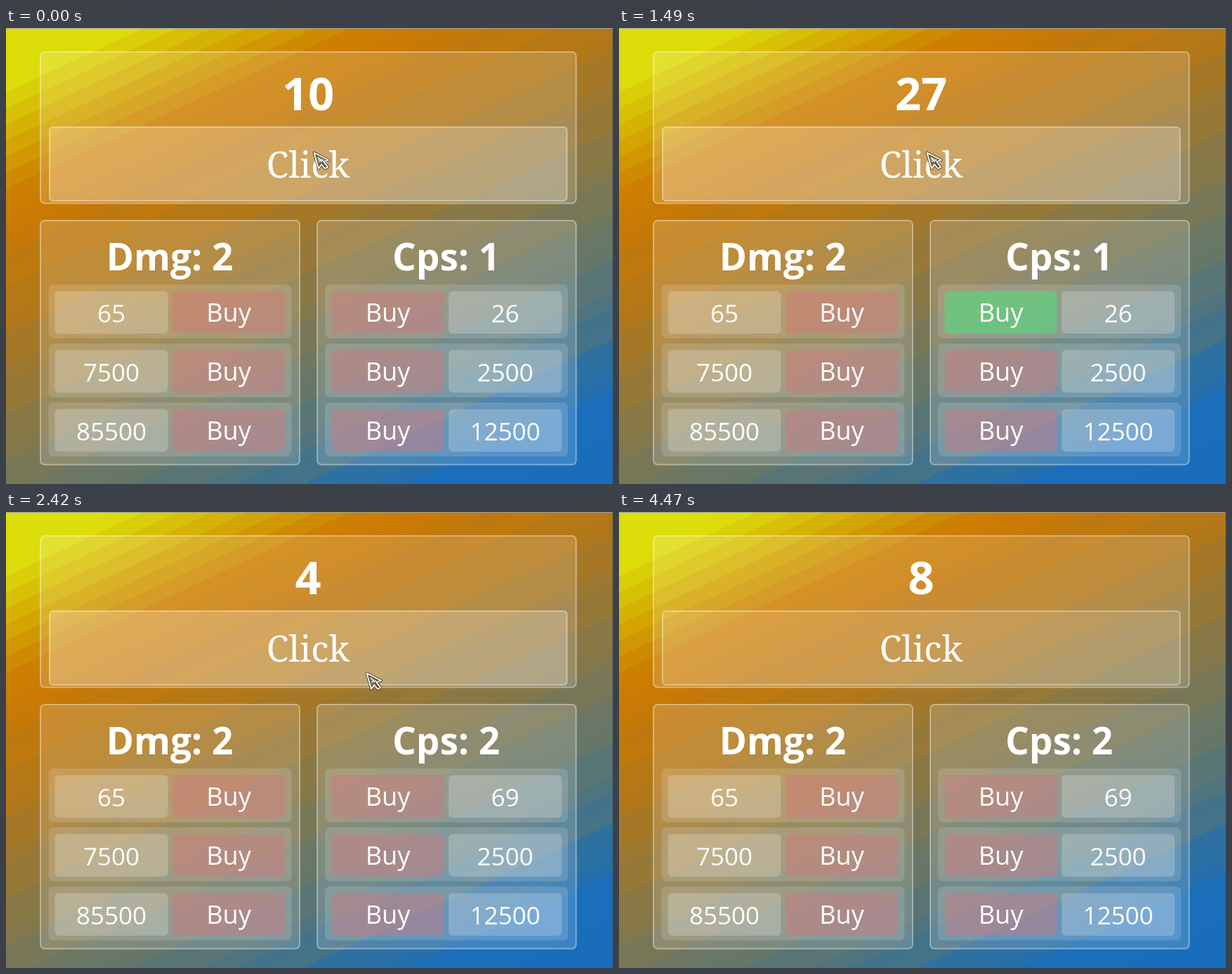
Recreate the animation shown at these times as an HTML page. Size 864x649 px, loop 4730 ms.

```html
<!DOCTYPE html>
<html lang="en">
<head>
<meta charset="utf-8">
<title>Clicker</title>
<style>
html, body { margin: 0; width: 100%; height: 100%; overflow: hidden; background: #a87a28; }
svg { display: block; width: 100%; height: 100%; }
text { fill: #fff; text-anchor: middle; font-family: "Open Sans", "Noto Sans", sans-serif; }
.total { font-size: 65px; font-weight: 700; }
.title { font-size: 53px; font-weight: 700; }
.value { font-size: 35px; }
.buy { font-size: 36px; }
.click { font-size: 51px; font-family: "Noto Serif", serif; }
</style>
</head>
<body>
<svg id="stage" viewBox="0 0 864 649"></svg>
<script>
const LOOP = 4730;
const stage = document.getElementById('stage');

function add(tag, attrs, parent = stage) {
  const el = document.createElementNS('http://www.w3.org/2000/svg', tag);
  for (const key in attrs) el.setAttribute(key, attrs[key]);
  parent.appendChild(el);
  return el;
}

function box(x0, y0, x1, y1, r, fill, stroke) {
  const attrs = { x: x0, y: y0, width: x1 - x0, height: y1 - y0, rx: r, fill };
  if (stroke) Object.assign(attrs, { stroke: white(.38), 'stroke-width': 2 });
  return add('rect', attrs);
}

function label(cls, x, y, str) {
  const el = add('text', { class: cls, x, y });
  el.textContent = str;
  return el;
}

function white(a) { return `rgba(255,255,255,${a})`; }

// Banded diagonal backdrop: [position, r, g, b]
const ramp = [
  [.075, 221, 221, 10], [.15, 212, 172, 3], [.225, 204, 127, 0], [.27, 200, 121, 5],
  [.385, 179, 120, 24], [.62, 117, 120, 90], [.76, 77, 116, 128],
  [.83, 45, 112, 160], [.88, 26, 110, 186], [1, 25, 109, 187]
];

function rampAt(t) {
  let i = 1;
  while (i < ramp.length - 1 && t > ramp[i][0]) i++;
  const a = ramp[i - 1], b = ramp[i];
  const k = Math.min(1, Math.max(0, (t - a[0]) / (b[0] - a[0])));
  return `rgb(${[1, 2, 3].map(c => Math.round(a[c] + (b[c] - a[c]) * k))})`;
}

function backdrop() {
  const angle = 155 * Math.PI / 180, sx = Math.sin(angle), sy = -Math.cos(angle);
  const half = (864 * sx + 649 * sy) / 2;
  const grad = add('linearGradient', {
    id: 'sky', gradientUnits: 'userSpaceOnUse',
    x1: 432 - sx * half, y1: 324.5 - sy * half, x2: 432 + sx * half, y2: 324.5 + sy * half
  }, add('defs', {}));
  const bands = 46;
  for (let i = 0; i < bands; i++) {
    const t = (i + .5) / bands;
    const color = rampAt(t + (t > .25 ? .016 * Math.sin(i * 2.4) : 0));
    for (const edge of [i, i + 1]) add('stop', { offset: edge / bands, 'stop-color': color }, grad);
  }
  add('rect', { width: 864, height: 649, fill: 'url(#sky)' });
  add('rect', { width: 864, height: 1, fill: '#96a0a2' });
  add('rect', { x: 863, width: 1, height: 649, fill: 'rgba(60,70,80,.5)' });
}

backdrop();

box(49, 34, 811.5, 249.5, 6, white(.15), true);
const total = label('total', 430, 117, '');
const button = box(62, 141, 798.5, 246, 5, white(.13), true);
label('click', 430, 213, 'Click');

box(49, 274, 418, 621.5, 6, white(.15), true);
box(443, 274, 811.5, 621.5, 6, white(.15), true);
label('title', 233, 345, 'Dmg: 2');
const cps = label('title', 626.5, 345, '');

const RED = 'rgba(212,114,122,.42)', GREEN = 'rgba(95,210,125,.7)';

function row(i, left, valueX, buyX, price) {
  const y = 365 + i * 84;
  box(left, y, left + 346, y + 76.5, 7, white(.14));
  box(valueX, y + 9.5, valueX + 161, y + 70, 6, white(.2));
  const buy = box(buyX, y + 9.5, buyX + 160, y + 70, 6, RED);
  const value = label('value', valueX + 80.5, y + 54.3, price);
  label('buy', buyX + 80, y + 53, 'Buy');
  return { buy, value };
}

[65, 7500, 85500].forEach((p, i) => row(i, 60.5, 69.5, 237, p));
const [auto] = [26, 2500, 12500].map((p, i) => row(i, 454, 630, 463.5, p));

const cursor = add('g', { 'stroke-linejoin': 'round' });
const arrow = 'M1.5 1.5 L22 12 L15 14 L21 22 L17 24 L12 18 L8 24 Z';
add('path', { d: arrow, fill: 'rgba(70,55,40,.45)', stroke: 'rgba(50,45,40,.7)', 'stroke-width': 4 }, cursor);
add('path', { d: arrow, fill: 'none', stroke: '#fff', 'stroke-width': 1.8 }, cursor);
add('path', { d: 'M7 8 L13 14 M8 14 L15 12', fill: 'none', stroke: '#fff', 'stroke-width': 1.3 }, cursor);

// Each event overrides part of the running state from its time on
const events = [
  { at: 0, n: 10, fill: 'hover', x: 437, y: 176, rate: 1, price: 26, ready: false },
  { at: 270, n: 12, fill: 'press' },
  { at: 390, n: 13, fill: 'hover' },
  { at: 540, n: 15, fill: 'press' },
  { at: 670, n: 17, fill: 'hover' },
  { at: 810, n: 18 },
  { at: 1090, n: 22, fill: 'press' },
  { at: 1240, n: 24 },
  { at: 1370, n: 26, fill: 'hover', ready: true },
  { at: 1490, n: 27 },
  { at: 1630, fill: 'plain', x: 478, y: 285 },
  { at: 1760, x: 508, y: 376 },
  { at: 1910, n: 28, x: 511, y: 396 },
  { at: 2030, n: 2, rate: 2, price: 69, ready: false },
  { at: 2170, x: 512, y: 335 },
  { at: 2300, n: 4, x: 512, y: 236, fill: 'hover' },
  { at: 2420, y: 228 },
  { at: 3190, n: 6 },
  { at: 3470, x: 517 },
  { at: 3590, x: 521, y: 229 },
  { at: 4050, n: 8, x: 523, y: 231 },
  { at: 4200, fill: 'plain', x: 640, y: 372 },
  { at: 4320, x: 821, y: 591 },
  { at: 4470, x: 900, y: 700 }
];
const fills = { plain: .13, hover: .22, press: .29 };

function draw(ms) {
  const s = Object.assign({}, ...events.filter(e => e.at <= ms));
  total.textContent = s.n;
  cps.textContent = 'Cps: ' + s.rate;
  auto.value.textContent = s.price;
  auto.buy.setAttribute('fill', s.ready ? GREEN : RED);
  button.setAttribute('fill', white(fills[s.fill]));
  cursor.setAttribute('transform', `translate(${s.x} ${s.y})`);
}

const start = performance.now();
function tick() {
  draw((performance.now() - start) % LOOP);
  requestAnimationFrame(tick);
}
tick();
</script>
</body>
</html>
```
